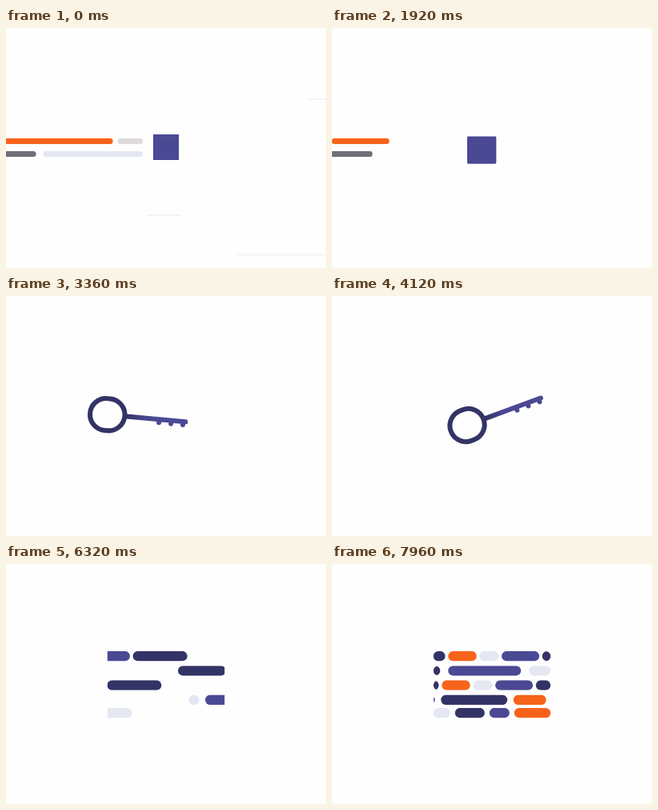
An HTML page with a canvas that plays this animation: 400 px wide and 300 px high, repeating every 8000 ms.

```html
<!DOCTYPE html>
<html lang="en">
<head>
<meta charset="utf-8">
<title>Data, lock, key, card</title>
<style>
html, body { margin: 0; width: 100%; height: 100%; overflow: hidden; background: #fefefe; }
canvas { display: block; width: 100%; height: 100%; }
</style>
</head>
<body>
<canvas id="stage" width="400" height="300"></canvas>
<script>
const ctx = document.getElementById('stage').getContext('2d');
const LOOP = 8000;
const COLORS = { B: '#4b4994', N: '#333366', O: '#f8631b', L: '#e5e8f2', G: '#dfdadb', K: '#717078' };

const clamp = v => Math.max(0, Math.min(1, v));
const mix = (a, b, p) => a + (b - a) * p;
const span = (t, from, to) => {
  const p = clamp((t - from) / (to - from));
  return p * p * (3 - 2 * p);
};
// Rises to 1, holds, falls back to 0
const pulse = (t, in0, in1, out0, out1) => span(t, in0, in1) * (1 - span(t, out0, out1));
const hop = p => Math.sin(Math.PI * p);

function random(seed) {
  const v = Math.sin(seed * 12.9898) * 43758.5453;
  return v - Math.floor(v);
}

// A word names each bar's colour and width, leading bar first
const bars = word => word.split(' ').map(s => [COLORS[s[0]], Number(s.slice(1))]);

const TRAILS = [
  { y: 141.5, lead: -200, gap: 6, bars: bars('O334 G122 O130 G280 L72 O72') },
  { y: 157.5, lead: -160, gap: 9, bars: bars('K198 L193 K105 L149 O38 G130 K112') }
];

// Rows stream in from alternating sides; a lower curve slows down sooner
const PHRASE = bars('N68 B47 L24 O35.5 N53');
const CODE = [
  { reach: 204, curve: 0.267, gap: 3.7, bars: PHRASE },
  { reach: 198, curve: 0.457, gap: 10, bars: bars('N60 B91 L50') },
  { reach: 196, curve: 0.398, gap: 3.7, bars: PHRASE },
  { reach: 221, curve: 0.597, gap: 7.5, bars: bars('L13 B56 N83 O41') },
  { reach: 232, curve: 0.753, gap: 6, bars: bars('L75 O50 B25 N37 L75') }
];

const SQUARE = { x: 200, y: 149, w: 30, h: 30, r: 0, line: 2 };
const LOCK = { x: 127.8, y: 169.5, w: 51.5, h: 40, r: 1, line: 5 };
const RING = { x: 128, y: 150, w: 43.5, h: 40, r: 20, line: 6 };
const CARD = { x: 199.6, y: 161.8, w: 140.5, h: 89, r: 10, line: 2.2 };

function blend(a, b, p) {
  return Object.fromEntries(Object.keys(a).map(k => [k, mix(a[k], b[k], p)]));
}

function roundRect(x, y, w, h, r) {
  ctx.beginPath();
  ctx.roundRect(x, y, w, h, r);
}

function arc(x, y, r, from, to) {
  ctx.beginPath();
  ctx.arc(x, y, r, from, to);
  ctx.stroke();
}

// Lays bars out behind `lead`; dir is the way the row travels
function barRow(row, y, lead, dir, h, left, right, radius) {
  ctx.save();
  roundRect(left, y - h / 2, right - left, h, radius);
  ctx.clip();
  let x = lead;
  for (const [color, width] of row.bars) {
    ctx.fillStyle = color;
    roundRect(dir < 0 ? x : x - width, y - h / 2, width, h, h / 2);
    ctx.fill();
    x -= dir * (width + row.gap);
  }
  ctx.restore();
}

function drawStreaks(t) {
  if (t > 2100) return;
  ctx.fillStyle = '#f4f4f5';
  const streak = (time, x, y, w) => ctx.fillRect(x - (t - time) * 0.7, y - 1, w, 2);
  streak(0, 379, 89, 60);
  streak(0, 176, 234, 44);
  streak(0, 290, 283.5, 130);
  streak(1080, -39, 20, 300);
  streak(1080, 280, 10.5, 45);
  for (let i = 1; i < 4; i++) {
    streak(i * 450 - 100, 400, 30 + 230 * random(i), 50 + 70 * random(i + 9));
  }
}

function drawTrails(t) {
  if (t > 2200) return;
  const right = mix(171, 90, span(t, 1850, 2200));
  for (const row of TRAILS) barRow(row, row.y, row.lead - t * 0.4, -1, 7.6, -20, right, 3.8);
}

function drawShackle(t) {
  const grow = pulse(t, 2150, 2420, 2600, 2850);
  if (!grow) return;
  ctx.save();
  ctx.translate(LOCK.x, 149);
  ctx.scale(1, grow);
  ctx.strokeStyle = COLORS.B;
  ctx.lineWidth = 5;
  ctx.beginPath();
  ctx.moveTo(-18.3, 0);
  ctx.arc(0, -20, 18.3, Math.PI, 0);
  ctx.lineTo(18.3, 0);
  ctx.stroke();
  ctx.restore();
}

function drawShaft(t) {
  const grow = pulse(t, 2900, 3300, 4600, 4850);
  if (!grow) return;
  const fade = ctx.createLinearGradient(24, 0, 50, 0);
  fade.addColorStop(0, COLORS.N);
  fade.addColorStop(1, COLORS.B);
  ctx.strokeStyle = fade;
  ctx.lineWidth = 6;
  ctx.lineCap = 'round';
  ctx.beginPath();
  ctx.moveTo(24, 0);
  ctx.lineTo(mix(24, 98, grow), 0);
  for (let i = 0; i < 3; i++) {
    const x = mix(24, 65 + 15 * i, grow);
    ctx.moveTo(x, 0);
    ctx.lineTo(x, 4 * grow);
  }
  ctx.stroke();
}

// One outline that is square, lock, key ring and card in turn
function bodyAt(t) {
  const spin = span(t, 3300, 4120), swing = span(t, 4240, 4760);
  const ring = {
    ...RING,
    x: RING.x + 41 * spin - 38 * hop(spin) - 9 * swing,
    y: RING.y + 11.5 * spin - 40 * hop(spin) + 10 * swing
  };
  let body = blend(SQUARE, LOCK, span(t, 1800, 2250));
  body = blend(body, ring, span(t, 2600, 3000));
  body = blend(body, CARD, span(t, 4700, 5040));
  body.angle = (339.7 * spin + 200.3 * swing) * Math.PI / 180;
  body.navy = pulse(t, 300, 700, 1500, 1900) + pulse(t, 2600, 3200, 4650, 4950);
  return body;
}

function drawBody(t) {
  const { x, y, w, h, r, line, angle, navy } = bodyAt(t);
  ctx.save();
  ctx.translate(x, y);
  ctx.rotate(angle);
  drawShaft(t);
  roundRect(-w / 2, -h / 2, w, h, r);
  ctx.strokeStyle = ctx.fillStyle =
    `rgb(${mix(75, 51, navy)},${mix(73, 51, navy)},${mix(148, 102, navy)})`;
  ctx.lineWidth = line;
  ctx.stroke();
  ctx.globalAlpha *= 1 - span(t, 1950, 2200);
  ctx.fill();
  ctx.restore();
}

function drawCardFace(t) {
  if (t < 5000) return;
  ctx.fillStyle = ctx.strokeStyle = COLORS.B;
  ctx.fillRect(129, 127, 141 * span(t, 5000, 5260), 26.5);
  const smile = pulse(t, 5200, 5450, 5900, 6080);
  if (!smile) return;
  ctx.lineWidth = 2.4;
  ctx.lineCap = 'round';
  const up = -Math.PI / 2, half = Math.PI / 2 * smile;
  for (const x of [166, 233]) arc(x, 169.7, 3.8, up - half, up + half);
  arc(199.6, 183.6, 8.3, -up - half, -up + half);
}

function drawCode(t) {
  const left = 126.8, right = 273.2;
  const progress = clamp((t - 6200) / 1760);
  if (!progress) return;
  CODE.forEach((row, i) => {
    const dir = i % 2 ? -1 : 1;
    const lead = (dir > 0 ? left : right) + dir * row.reach * progress ** row.curve;
    const y = Math.min(115.2 + 18.2 * i, 186.2);
    const radius = 6.2 * span(t, 6600 + i * 200, 6800 + i * 200);
    barRow(row, y, lead, dir, 12.5, left, right, radius);
  });
}

function draw(t) {
  ctx.fillStyle = '#fefefe';
  ctx.fillRect(0, 0, 400, 300);
  drawStreaks(t);
  drawTrails(t);
  drawShackle(t);
  ctx.save();
  ctx.globalAlpha = 1 - span(t, 6050, 6300);
  drawBody(t);
  drawCardFace(t);
  ctx.restore();
  drawCode(t);
}

const start = performance.now();
function tick() {
  draw((performance.now() - start) % LOOP);
  requestAnimationFrame(tick);
}
tick();
</script>
</body>
</html>
```
